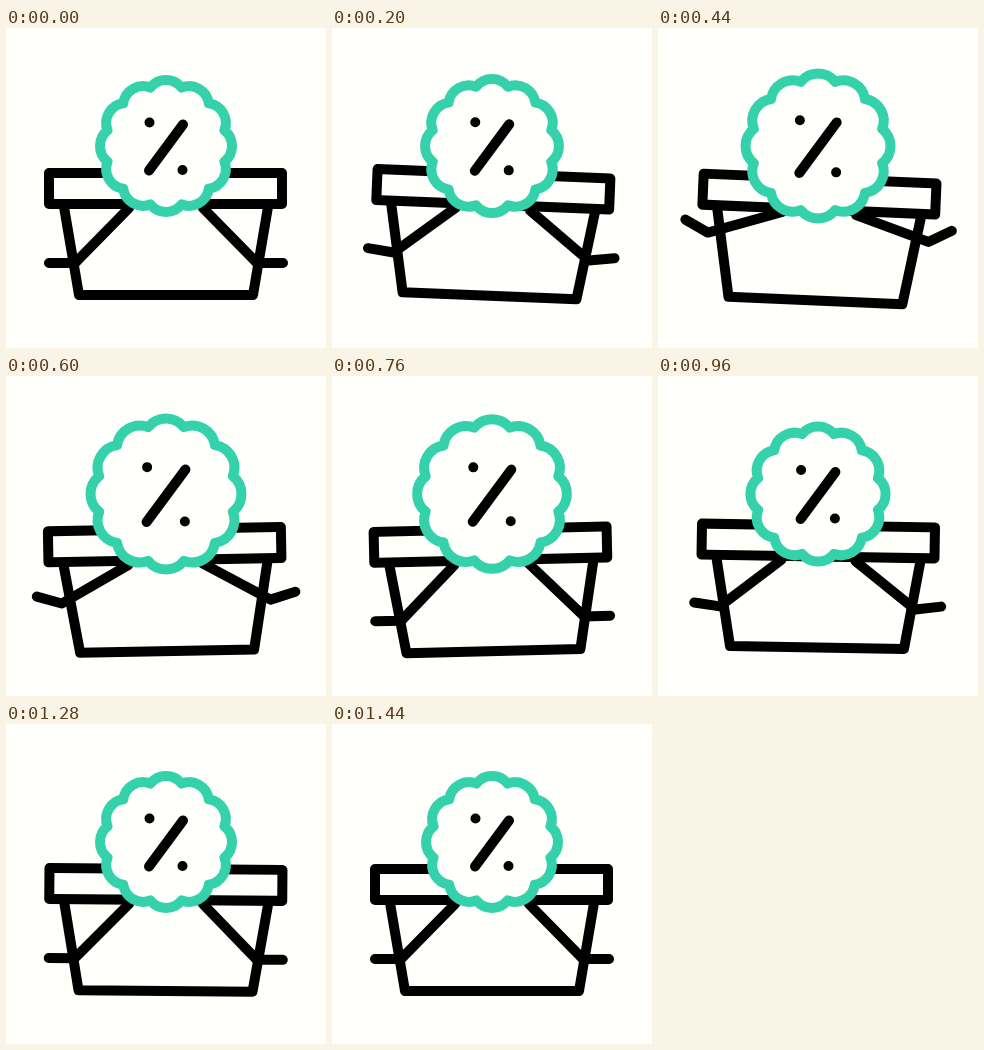
These frames come from a looping animation (320 by 320 pixels, 1480 ms). An HTML page:

```html
<!DOCTYPE html>
<html lang="en">
<head>
<meta charset="utf-8">
<title>Basket discount</title>
<style>
  html, body { margin: 0; width: 100%; height: 100%; overflow: hidden; background: #fffffc; }
  svg { display: block; width: 100vw; height: 100vh; }
  path { fill: none; stroke: #000; stroke-width: 10; stroke-linecap: round; stroke-linejoin: round; }
  #seal { fill: #fffffc; stroke: #34d1aa; }
</style>
</head>
<body>
<svg viewBox="0 0 320 320">
  <g id="basket">
    <path d="M43 145H276V176H43Z"/>
    <path d="M58 179L73 267H247L262 179"/>
    <path id="left" d="M123 180L69 235H43"/>
    <path id="right" d="M197 180L251 235H277"/>
  </g>
  <path id="seal"/>
  <path id="percent"/>
</svg>
<script>
const LOOP = 1480, STEP = 40;
const CX = 160, CY = 118;
const $ = id => document.getElementById(id);
const basket = $('basket'), left = $('left'), right = $('right');
const seal = $('seal'), percent = $('percent');

// Sine ease in and out between [time, value] turning points
function swing(...keys) {
  return t => {
    const i = keys.findIndex(k => k[0] > t);
    if (i <= 0) return keys[i ? keys.length - 1 : 0][1];
    const [t0, v0] = keys[i - 1], [t1, v1] = keys[i];
    return v0 + (v1 - v0) * (1 - Math.cos(Math.PI * (t - t0) / (t1 - t0))) / 2;
  };
}

const grow = swing([80, 1], [680, 1.15], [1060, 1]);
const drop = swing([80, 0], [680, 8.5], [1260, 0]);
const tilt = swing([40, 0], [320, 3.8], [680, -1.7], [1040, 1.3], [1440, 0]);
const flap = swing([60, 0], [470, 28], [760, 0.5], [960, 7.5], [1300, 0]);

function scallop(n, r, bump) {
  let d = '';
  for (let i = 0; i <= n; i++) {
    const a = (i + 0.5) / n * 2 * Math.PI;
    const p = `${CX + r * Math.cos(a)} ${CY + r * Math.sin(a)}`;
    d += i ? `A${bump} ${bump} 0 0 1 ${p}` : `M${p}`;
  }
  return d + 'Z';
}

// The badge grows while its line weight stays the same
function drawBadge(s) {
  const at = (x, y) => `${CX + x * s} ${CY + y * s}`;
  const dot = (x, y) => `M${at(x, y)}h.01`;
  seal.setAttribute('d', scallop(12, 60.5 * s, 20 * s));
  percent.setAttribute('d', `M${at(17, -21.5)}L${at(-17, 24.5)}` + dot(-16.5, -23.5) + dot(16.5, 24));
}

function draw(now) {
  const t = Math.floor(now % LOOP / STEP) * STEP;
  basket.setAttribute('transform', `translate(0 ${drop(t)}) rotate(${tilt(t)} 160 206)`);
  left.setAttribute('transform', `rotate(${flap(t)} 123 180)`);
  right.setAttribute('transform', `rotate(${-flap(t)} 197 180)`);
  drawBadge(grow(t));
}

const start = performance.now();
function tick() {
  draw(performance.now() - start);
  requestAnimationFrame(tick);
}
tick();
</script>
</body>
</html>
```
